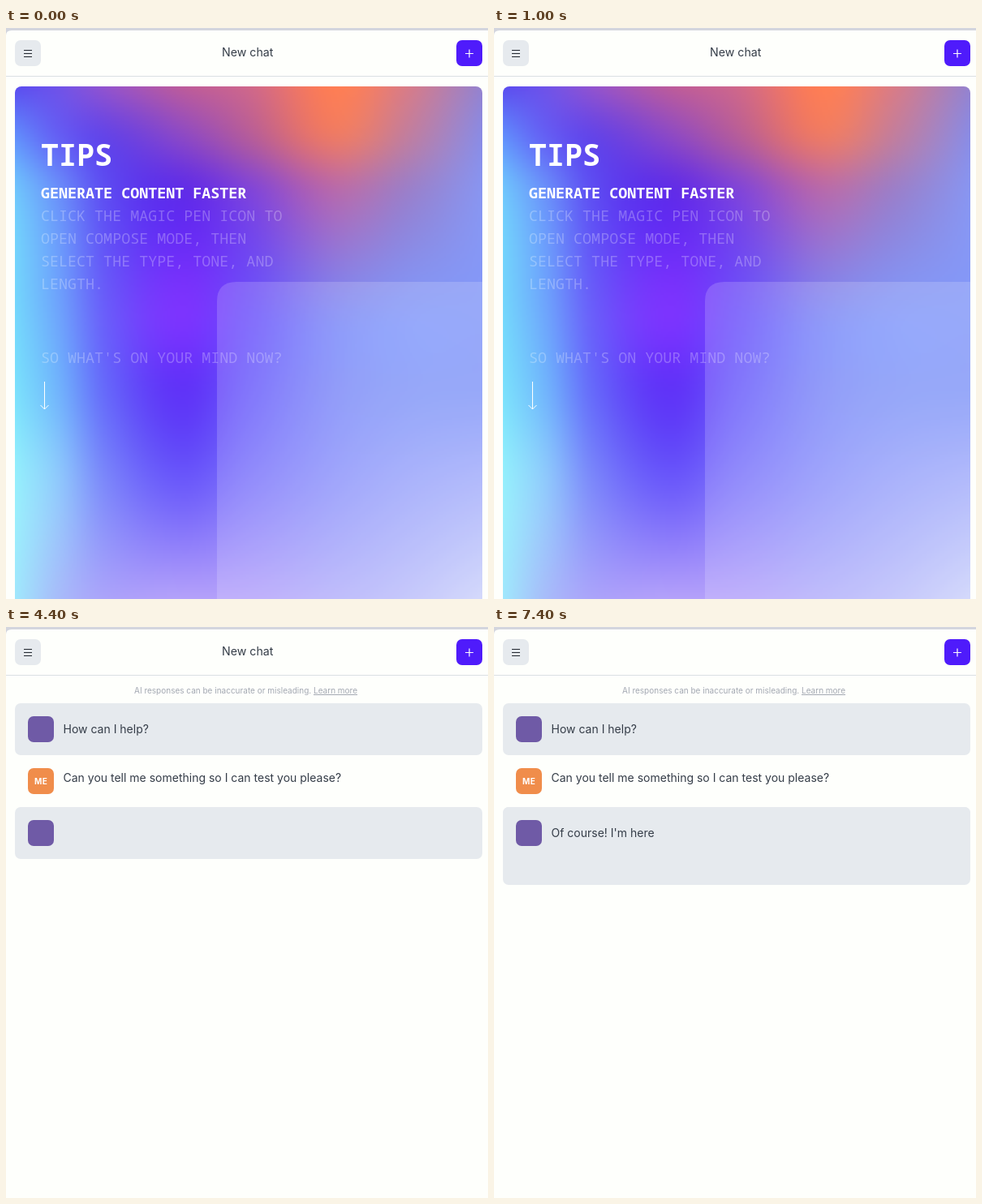
Recreate the animation shown at these times as an HTML page with a canvas. Size 594 by 704 pixels, loop 8000 ms.

```html
<!DOCTYPE html>
<html lang="en">
<head>
<meta charset="utf-8">
<title>New chat</title>
<style>
  html, body { margin: 0; width: 100%; height: 100%; overflow: hidden; background: #fefffc; }
  #stage { position: relative; width: 594px; height: 704px; overflow: hidden; }
  svg { position: absolute; left: 0; top: 0; }
  canvas { position: absolute; left: 11px; top: 72px; width: 576px; height: 632px; border-radius: 8px 8px 0 0; }
  text { white-space: pre; }
  .ui { font: 14px Inter, "Open Sans", sans-serif; fill: #353d48; }
  .note { font-size: 10px; fill: #a3a8b2; }
  .me { font-size: 10px; font-weight: 700; fill: #fff; letter-spacing: .4px; }
  .tips { font: 18.36px "Noto Sans Mono", "DejaVu Sans Mono", monospace; fill: #fff; }
  .tips .head { font-size: 36.7px; font-weight: 700; }
  .tips .bold { font-weight: 700; }
  .tips .dim { fill-opacity: .27; }
  .bubble { fill: #e6eaee; }
  .logo { fill: #6f5aa6; }

  .tip, .chat, .title, .tall, .caret { animation: 8s step-end infinite; }
  .tip { animation-name: leave; }
  .chat { animation-name: enter; }
  .caret { animation-name: blink; fill: #353d48; }
  .tall { animation-name: grow; }
  .title { animation-name: clear; }
  .word { animation: 8s step-end infinite; }
  .w1 { animation-name: w1; }
  .w2 { animation-name: w2; }
  .w3 { animation-name: w3; }

  @keyframes leave { 0% { opacity: 1 } 30%, 100% { opacity: 0 } }
  @keyframes enter { 0% { opacity: 0 } 30%, 100% { opacity: 1 } }
  @keyframes grow { 0% { opacity: 0 } 67.5%, 100% { opacity: 1 } }
  @keyframes clear { 0% { opacity: 1 } 77.5%, 100% { opacity: 0 } }
  @keyframes blink {
    0%, 33.75%, 38.75%, 55%, 58.75%, 63.75%, 100% { opacity: 0 }
    31.25%, 36.25%, 41.25%, 56.25%, 62.5% { opacity: 1 }
  }
  @keyframes w1 { 0% { fill-opacity: 0 } 77.5%, 100% { fill-opacity: 1 } }
  @keyframes w2 { 0% { fill-opacity: 0 } 82.5%, 100% { fill-opacity: 1 } }
  @keyframes w3 { 0% { fill-opacity: 0 } 92.5%, 100% { fill-opacity: 1 } }
</style>
</head>
<body>
<div id="stage">
  <canvas id="mesh" class="tip" width="288" height="316"></canvas>
  <svg width="594" height="704" viewBox="0 0 594 704">
    <!-- header -->
    <path d="M0 0H594V3H7Q0 3 0 9Z" fill="#d3d5de"/>
    <rect y="59" width="594" height="1" fill="#dbe0e4"/>
    <rect x="11" y="15" width="32" height="32" rx="7" class="bubble"/>
    <path d="M22 27.5H32M22 31.5H32M22 35.5H32" stroke="#20262e"/>
    <rect x="555" y="15" width="32" height="32" rx="7" fill="#4f1bfb"/>
    <path d="M566 31.5H576M571 26.5V36.5" stroke="#fff" stroke-width="1.2"/>
    <text class="ui title" x="266" y="35" style="font-size:14.2px">New chat</text>

    <!-- tips card -->
    <g class="tip">
      <path d="M587 313H284Q260 313 260 337V704H587Z" fill="#fff" fill-opacity=".17"/>
      <g class="tips">
        <text class="head" x="43" y="170">TIPS</text>
        <text class="bold" x="43" y="209.5">GENERATE CONTENT FASTER</text>
        <g class="dim">
          <text x="43" y="237.5">CLICK THE MAGIC PEN ICON TO</text>
          <text x="43" y="265.5">OPEN COMPOSE MODE, THEN</text>
          <text x="43" y="293.5">SELECT THE TYPE, TONE, AND</text>
          <text x="43" y="321.5">LENGTH.</text>
          <text x="43" y="412.5">SO WHAT'S ON YOUR MIND NOW?</text>
        </g>
      </g>
      <path d="M47.5 436V470M42.5 465L47.5 470L52.5 465" fill="none" stroke="#fff"/>
    </g>

    <!-- conversation -->
    <g class="chat">
      <text class="ui note" x="158" y="82">AI responses can be inaccurate or misleading. <tspan text-decoration="underline">Learn more</tspan></text>
      <rect x="11" y="94" width="576" height="64" rx="7" class="bubble"/>
      <rect x="27" y="110" width="32" height="32" rx="7" class="logo"/>
      <text class="ui" x="70.5" y="131">How can I help?</text>
      <rect x="27" y="174" width="32" height="32" rx="7" fill="#f08d4b"/>
      <text class="ui me" x="43.2" y="193.8" text-anchor="middle">ME</text>
      <text class="ui" x="70.5" y="191">Can you tell me something so I can test you please?</text>
      <rect x="11" y="222" width="576" height="64" rx="7" class="bubble"/>
      <rect x="11" y="222" width="576" height="96" rx="7" class="bubble tall"/>
      <rect x="27" y="238" width="32" height="32" rx="7" class="logo"/>
      <rect x="70" y="245" width="8" height="21" class="caret"/>
      <text class="ui" x="70.5" y="259"><tspan class="word w1">Of cou</tspan><tspan class="word w2">rse!</tspan><tspan class="word w3"> I'm here</tspan></text>
    </g>
  </svg>
</div>
<script>
  // Smooth mesh gradient: colour stops on a loose grid, joined by cubic curves.
  const xs = [11, 65, 125, 215, 300, 405, 495, 587];
  const ys = [72, 135, 205, 350, 450, 560, 704];
  const mesh = [
    '5a4cf0 7052e8 9454cc bc5c9c d0688a ff7e54 d87c88 9482d0',
    '6290fc 6460f4 6444e8 8a48c8 b45c9c ec7a68 c07ea0 8a8ce6',
    '70c8fc 6a90fa 5e4cf2 602cea 7e44dc b46ab0 9a80cc 8896f2',
    '74d8fc 6ea4fc 6a5cfa 7c34fe 6c50fa 7c84f4 8296f8 8498f8',
    '7ce2fc 72b4fc 6668fa 6034f8 6a5cfa 7c88f8 8296f8 8498f8',
    '96f0fc 90c8fc 7c86fa 6c5afa 7e76fa 8e94fa 9aa4fa a4aefa',
    'a0e8fc a8bcfa aca4fa b4a2fa b4a2fa b4b0fa bcbefa ccd2fa'
  ].map(row => row.split(' ').map(hex => [0, 2, 4].map(i => parseInt(hex.substr(i, 2), 16))));

  function curve(pos, cols, at) {
    const last = pos.length - 1;
    let i = 0;
    while (i < last - 1 && at > pos[i + 1]) i++;
    const h = pos[i + 1] - pos[i], t = (at - pos[i]) / h, u = 1 - t;
    const slope = (k, c) => {
      const a = Math.max(k - 1, 0), b = Math.min(k + 1, last);
      return (cols[b][c] - cols[a][c]) / (pos[b] - pos[a]);
    };
    return [0, 1, 2].map(c =>
      u * u * (1 + 2 * t) * cols[i][c] + t * t * (3 - 2 * t) * cols[i + 1][c] +
      h * t * u * (u * slope(i, c) - t * slope(i + 1, c)));
  }

  const canvas = document.getElementById('mesh');
  const ctx = canvas.getContext('2d');
  const img = ctx.createImageData(canvas.width, canvas.height);
  for (let y = 0, p = 0; y < canvas.height; y++) {
    const row = xs.map((_, k) => curve(ys, mesh.map(r => r[k]), 73 + y * 2));
    for (let x = 0; x < canvas.width; x++, p += 4) {
      img.data.set([...curve(xs, row, 12 + x * 2), 255], p);
    }
  }
  ctx.putImageData(img, 0, 0);
</script>
</body>
</html>
```
